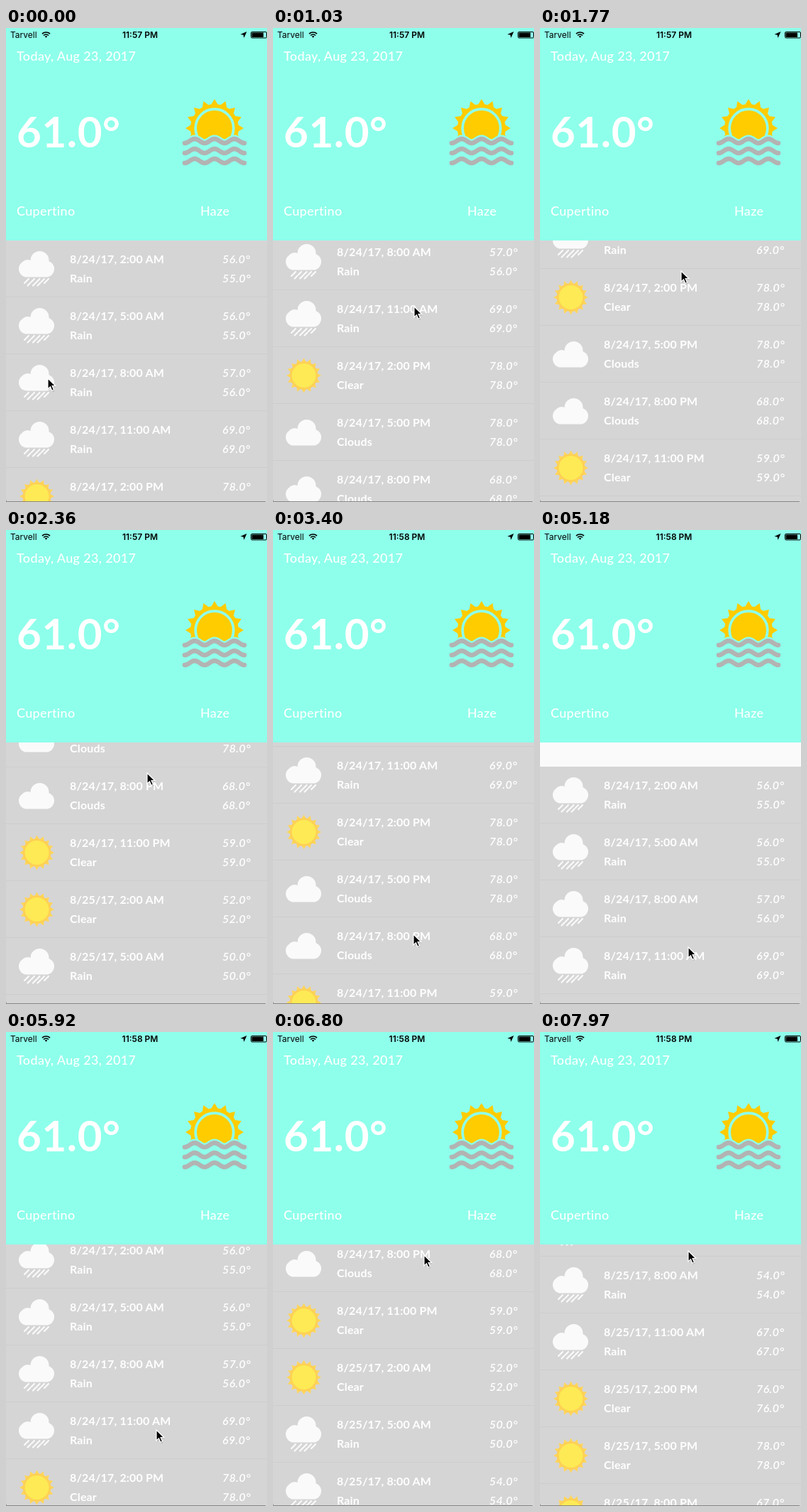
Write an HTML page that moves like this. It is 368x667 px and loops after 8 s.

```html
<!DOCTYPE html>
<html lang="en">
<head>
<meta charset="utf-8">
<title>Weather</title>
<style>
  html, body { margin: 0; width: 100%; height: 100%; overflow: hidden; background: #fafafa; }
  svg { display: block; }
  text { font-family: Lato, "Open Sans", sans-serif; fill: #fff; white-space: pre; }
  .label { font-size: 18px; font-weight: 500; letter-spacing: .35px; }
  .big { font-size: 60px; font-weight: 700; letter-spacing: .6px; }
  .row { font-size: 16px; font-weight: 700; letter-spacing: .16px; }
  .temp { font-size: 16px; font-weight: 600; font-style: italic; letter-spacing: .4px; }
  .status { font: 12px Inter, Roboto, sans-serif; fill: #000; }
  .clock { font-weight: 600; text-anchor: middle; }
</style>
</head>
<body>
<svg width="368" height="667" viewBox="0 0 368 667">
  <defs>
    <g id="cloud" fill="#fafafa">
      <rect x="18" y="28.5" width="50" height="23" rx="11.5"/>
      <circle cx="47.5" cy="28" r="13"/>
      <circle cx="30.5" cy="36.5" r="9.5"/>
    </g>
    <g id="Clouds"><use href="#cloud" y="7"/></g>
    <g id="Rain">
      <use href="#cloud"/>
      <path d="M32 54l-6 6M40 54l-4 4M34.500 59.500l-4 4M47.500 54l-9.500 9.500M54 54l-4 4M48.500 59.500l-4 4M60 54l-6 6"
        stroke="#fafafa" stroke-width="2.2" stroke-linecap="round"/>
    </g>
    <g id="Clear" transform="translate(43.5 40)">
      <path class="rays" data-size="24.5 18.5 16" fill="#ffd55c"/>
      <circle r="19.7" fill="#ffd055"/>
      <circle r="17" fill="#fdea55"/>
    </g>
  </defs>

  <g id="list"></g>

  <rect width="368" height="299" fill="#8effeb"/>
  <g transform="translate(294 141)">
    <path class="rays" data-size="41 31.5 16" fill="#fc0"/>
    <circle r="34" fill="#fc0"/>
    <circle r="26.8" fill="#fc0" stroke="#8effeb" stroke-width="3.7"/>
  </g>
  <g id="haze" fill="none" stroke-linecap="round" stroke-linejoin="round"></g>

  <text class="label" x="15" y="46">Today, Aug 23, 2017</text>
  <text class="big" x="15" y="168">61.0°</text>
  <text class="label" x="15" y="264">Cupertino</text>
  <text class="label" x="274" y="264">Haze</text>

  <text class="status" x="6" y="13.5">Tarvell</text>
  <g fill="none" stroke="#000" stroke-width="1.7">
    <path d="M51 8.200a8 8 0 0 1 11 0M53 10.500a5 5 0 0 1 7 0"/>
    <path d="M54.700 11.800a2.600 2.600 0 0 1 3.600 0L56.500 13.800z" fill="#000" stroke="none"/>
  </g>
  <text class="status clock" id="clock" x="189" y="13.5"></text>
  <path d="M339.500 5l-4 9-.8-4.200-4.200-.8z"/>
  <rect x="345.5" y="5.5" width="22" height="8.5" rx="1.5" fill="none" stroke="#000"/>
  <rect x="346.5" y="6.5" width="16.5" height="6.5"/>

  <path d="M2 666.500H366" stroke="#858585"/>
  <path d="M0 663.500V667H3.500Q.5 666.500 0 663.500z" fill="#858585"/>

  <g id="cursor">
    <path d="M1 1.500v15l3.500-3.300 2.400 5.600 2.600-1.100-2.400-5.500h4.800z" fill="#000" opacity=".2"/>
    <path d="M0 0v15l3.500-3.300 2.400 5.600 2.600-1.100-2.400-5.500h4.800z" stroke="#fff" stroke-width="1.2"/>
  </g>
</svg>
<script>
const LOOP = 8000, STEP = 147.7, LAST_STEP = 54, TOP = 299, ROW = 80;
const $ = id => document.getElementById(id);

// Forecast from 8/24 2:00 AM onward, every three hours: sky, high, low
const forecast = [
  ["Rain", 56, 55], ["Rain", 56, 55], ["Rain", 57, 56], ["Rain", 69, 69],
  ["Clear", 78, 78], ["Clouds", 78, 78], ["Clouds", 68, 68], ["Clear", 59, 59],
  ["Clear", 52, 52], ["Rain", 50, 50], ["Rain", 54, 54], ["Rain", 67, 67],
  ["Clear", 76, 76], ["Clear", 78, 78], ["Clear", 67, 67], ["Clear", 59, 59]
];

function timeLabel(i) {
  const hour = 2 + 3 * (i % 8);
  return `8/${24 + Math.floor(i / 8)}/17, ${hour % 12 || 12}:00 ${hour < 12 ? "AM" : "PM"}`;
}

$("list").innerHTML = forecast.map(([sky, high, low], i) => `
  <g transform="translate(0 ${TOP + i * ROW})">
    <rect width="368" height="${ROW}" fill="#d5d5d5"/>
    <rect y="79" width="368" height="1" fill="#cdcdcd"/>
    <use href="#${sky}"/>
    <text class="row" x="90" y="31.5">${timeLabel(i)}</text>
    <text class="row" x="90" y="58.5">${sky}</text>
    <text class="temp" x="305" y="31.5">${high}.0°</text>
    <text class="temp" x="305" y="58.5">${low}.0°</text>
  </g>`).join("");

for (const path of document.querySelectorAll(".rays")) {
  const [outer, inner, count] = path.dataset.size.split(" ").map(Number);
  const points = Array.from({ length: count * 2 }, (_, i) => {
    const r = i % 2 ? inner : outer, a = i * Math.PI / count - Math.PI / 2;
    return `${(r * Math.cos(a)).toFixed(2)} ${(r * Math.sin(a)).toFixed(2)}`;
  });
  path.setAttribute("d", `M${points.join("L")}z`);
}

function wave(y) {
  const points = [];
  for (let x = 0; x <= 84; x += 2)
    points.push(`${252 + x} ${(y + 3 * Math.cos(x * Math.PI / 14)).toFixed(2)}`);
  return "M" + points.join("L");
}

// The first wave cuts off the sun, leaving a gap above it
$("haze").innerHTML =
  `<path d="${wave(159)}V200H252z" fill="#8effeb" stroke="#8effeb" stroke-width="11"/>` +
  [159, 173, 187].map(y => `<path d="${wave(y)}" stroke="#b3b3b3" stroke-width="6.5"/>`).join("");

// Keys are [step, value] pairs
const scrollKeys = [[0, 0], [3, 0], [7, 170], [9, 197], [10, 197], [12, 280], [16, 445],
  [18, 461], [23, 234], [26, 50], [28, -22], [30.5, 0], [32, 0], [35, -34], [38, 0],
  [39, 0], [44, 290], [46, 493], [54, 783]];
const cursorX = [[0, 59], [3, 199], [16, 199], [23, 198], [35, 209], [46, 213], [54, 209]];
const cursorY = [[0, 493], [3, 562], [7, 392], [9, 365], [10, 365], [12, 342], [18, 342],
  [23, 569], [25, 600], [30, 500], [32, 500], [35, 587], [39, 587], [44, 320], [46, 314], [54, 308]];

// Monotone cubic interpolation: smooth, and flat at turning points
function at(keys, s) {
  const slope = i => keys[i] && keys[i + 1]
    ? (keys[i + 1][1] - keys[i][1]) / (keys[i + 1][0] - keys[i][0]) : 0;
  const tangent = i => {
    const a = slope(i - 1), b = slope(i);
    return a * b > 0 ? 2 * a * b / (a + b) : 0;
  };
  let i = 0;
  while (i < keys.length - 2 && s >= keys[i + 1][0]) i++;
  const [s0, v0] = keys[i], [s1, v1] = keys[i + 1];
  const d = s1 - s0, u = (s - s0) / d, w = 1 - u;
  return v0 * w * w * (1 + 2 * u) + v1 * u * u * (3 - 2 * u)
    + d * u * w * (tangent(i) * w - tangent(i + 1) * u);
}

function draw() {
  const t = performance.now() % LOOP;
  const s = Math.min(LAST_STEP, Math.floor((t + 8) / STEP));
  const move = (id, x, y) => $(id).setAttribute("transform", `translate(${Math.round(x)} ${Math.round(y)})`);
  move("list", 0, -at(scrollKeys, s));
  move("cursor", at(cursorX, s), at(cursorY, s));
  $("clock").textContent = s < 17 ? "11:57 PM" : "11:58 PM";
  requestAnimationFrame(draw);
}
draw();
</script>
</body>
</html>
```
